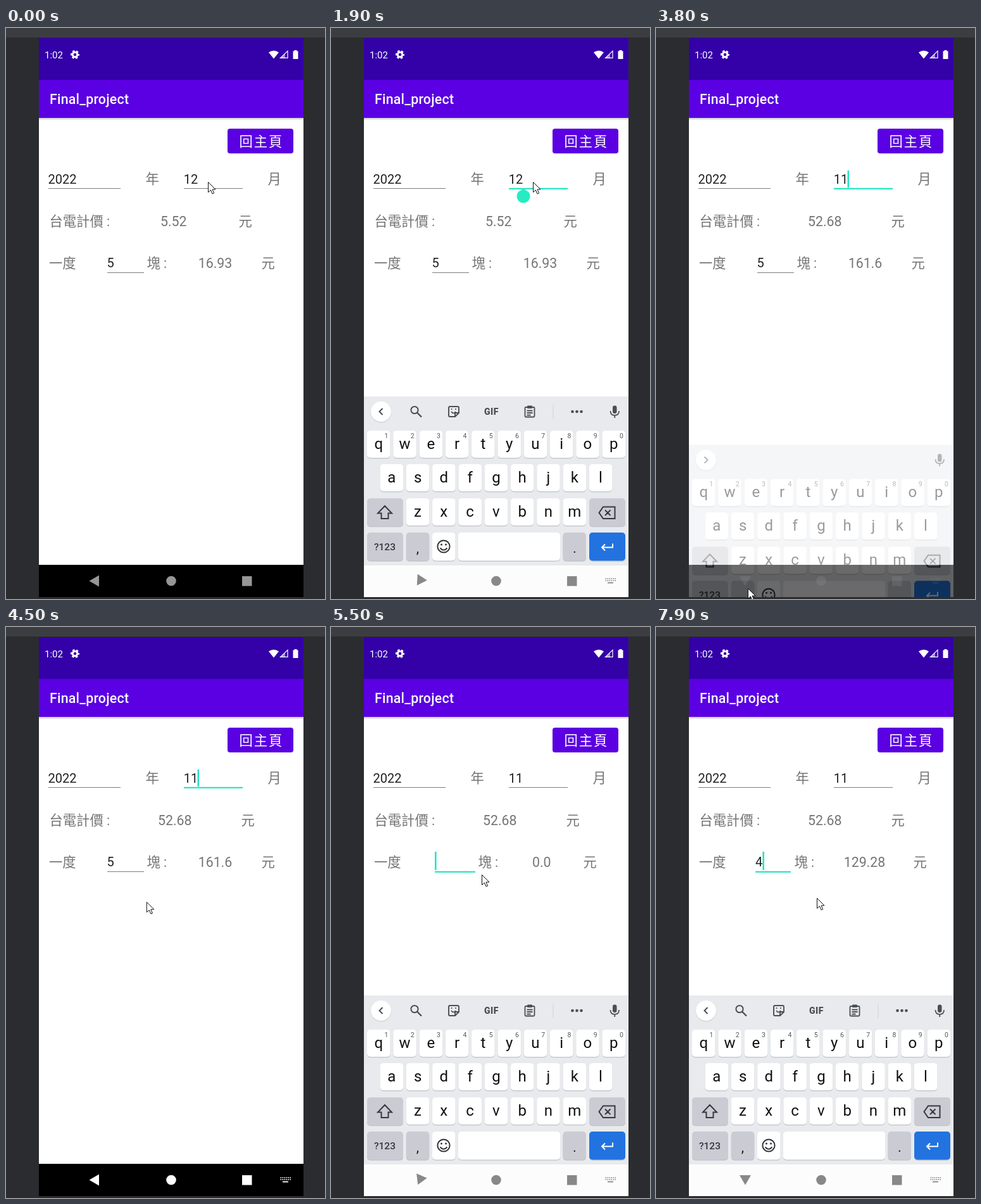
Write an HTML page that moves like this. It is 504x902 px and loops after 8 s.

```html
<!DOCTYPE html>
<html lang="zh-Hant">
<head>
<meta charset="utf-8">
<title>Final_project</title>
<style>
html, body { margin: 0; width: 100%; height: 100%; overflow: hidden; background: #2b2c2f; }
svg { display: block; width: 504px; height: 902px; }
text { font-family: Roboto, "Noto Sans CJK TC", "Noto Sans CJK JP", "Noto Sans CJK", sans-serif; white-space: pre; }
</style>
</head>
<body>
<svg id="stage" viewBox="0 0 504 902" xmlns="http://www.w3.org/2000/svg"></svg>
<script>
const LOOP = 8000;
const TEAL = '#25e3c3', GREY = '#757575', INK = '#212121', ICON = '#4b4e53';
const stage = document.getElementById('stage');

function el(parent, tag, attrs = {}, content) {
  const node = document.createElementNS('http://www.w3.org/2000/svg', tag);
  set(node, attrs);
  if (content !== undefined) node.textContent = content;
  parent.appendChild(node);
  return node;
}
function set(node, attrs) {
  for (const k in attrs) node.setAttribute(k, attrs[k]);
}
const group = (p, attrs) => el(p, 'g', attrs);
const rect = (p, x, y, width, height, fill, rx = 0) => el(p, 'rect', { x, y, width, height, fill, rx });
const circle = (p, cx, cy, r, fill) => el(p, 'circle', { cx, cy, r, fill });
const shape = (p, d, fill) => el(p, 'path', { d, fill });
const line = (p, d, stroke, width = 2) =>
  el(p, 'path', { d, fill: 'none', stroke, 'stroke-width': width });
const label = (p, x, y, str, size, fill, more) =>
  el(p, 'text', { x, y, 'font-size': size, fill, ...more }, str);
const show = (node, on) => node.setAttribute('visibility', on ? 'visible' : 'hidden');
const MID = { 'text-anchor': 'middle' };

const defs = el(stage, 'defs');
rect(el(defs, 'clipPath', { id: 'screen' }), 52, 16, 418, 883);
const fade = el(defs, 'linearGradient', { id: 'fade', x1: 0, y1: 0, x2: 0, y2: 1 });
el(fade, 'stop', { offset: 0, 'stop-color': '#000', 'stop-opacity': 0.22 });
el(fade, 'stop', { offset: 1, 'stop-color': '#000', 'stop-opacity': 0 });

// Emulator window
rect(stage, 0, 0, 504, 902, '#2b2c2f');
rect(stage, 0, 0, 504, 15, '#3c3d41');
const phone = group(stage, { 'clip-path': 'url(#screen)' });
rect(phone, 52, 16, 418, 883, '#fff');
rect(phone, 52, 142, 418, 4, 'url(#fade)');
rect(phone, 52, 15, 418, 67, '#3400a8');
rect(phone, 52, 82, 418, 60, '#5a00e2');

// Status bar
label(phone, 61, 48, '1:02', 15, '#fff');
el(phone, 'circle', { cx: 109, cy: 42, r: 3.8, fill: 'none', stroke: '#fff', 'stroke-width': 3 });
el(phone, 'circle', { cx: 109, cy: 42, r: 5.8, fill: 'none', stroke: '#fff', 'stroke-width': 2.4,
  'stroke-dasharray': '3.4 2.674', 'stroke-dashoffset': 1.7 });
shape(phone, 'M415 38.5Q423 33 431 38.5L423 48.5Z', '#fff');
line(phone, 'M433.5 47.4L445 36.4V47.4Z', '#fff', 1.2);
shape(phone, 'M433 48L441 40V48Z', '#ffffff88');
shape(phone, 'M455.5 35h4v1.5h2V49h-8V36.5h2z', '#fff');

// App page
label(phone, 69, 120, 'Final_project', 21.3, '#fff', { 'font-weight': 500, 'letter-spacing': 0.27 });
rect(phone, 350, 160, 104, 38.6, '#00000030', 4);
rect(phone, 350, 159, 104, 39, '#5a00e2', 4);
label(phone, 368.5, 187, '回主頁', 21.3, '#fff', { 'letter-spacing': 2 });

const body = (x, y, str) => label(phone, x, y, str, 21.3, GREY);
const input = (x, y, str) => label(phone, x, y, str, 20, INK);
input(66.6, 246, '2022');
rect(phone, 67, 253, 114, 1, '#7d7d7d');
body(220.5, 246, '年');
body(413.5, 246, '月');
body(68.5, 312.5, '台電計價 :');
body(68, 378.5, '一度');
const month = input(280.8, 246, '');
const bill = body(0, 312.5, '');
const billUnit = body(0, 312.5, '元');
const rate = input(0, 378, '');
const rateUnit = body(0, 378.5, '塊 :');
const cost = body(0, 378.5, '');
const costUnit = body(0, 378.5, '元');
const monthLine = rect(phone, 281, 253, 93, 1, '#7d7d7d');
const rateLine = rect(phone, 160, 386, 58, 1, '#7d7d7d');
const caret = rect(phone, 0, 0, 2.6, 28, TEAL);
const handle = shape(phone, 'M0 0L8 5.5A10.5 10.5 0 1 1 -8 5.5Z', '#24edc3');

rect(phone, 52, 848, 418, 51, '#000');

// Keyboard
const board = group(phone);
rect(board, 52, 582, 418, 330, '#e8eaed');
rect(board, 52, 849, 418, 64, '#fcfcfc');
circle(board, 79, 607, 16.5, '#d3d5d9');
circle(board, 79, 606, 16, '#fff');
const chevron = line(board, '', ICON, 2);
const tools = group(board);
el(tools, 'circle', { cx: 132, cy: 603.5, r: 5.6, fill: 'none', stroke: ICON, 'stroke-width': 2 });
line(tools, 'M136 607.5L143 614.5', ICON, 2.4);
line(tools, 'M188 598h12q2 0 2 2v8l-6 6h-8q-2 0-2-2v-12q0-2 2-2zM202 608h-6v6', ICON, 1.9);
line(tools, 'M190 606q3.5 5 7 0M190.5 601v2M197 601v2', ICON, 1.6);
label(tools, 253.5, 611, 'GIF', 14, ICON, { ...MID, 'font-weight': 900, 'letter-spacing': 0.6 });
line(tools, 'M308 599h12q1.5 0 1.5 1.5v12.5q0 1.5-1.5 1.5h-12q-1.5 0-1.5-1.5v-12.5q0-1.5 1.5-1.5zM309.5 604.5h9M309.5 608h9M309.5 611.5h6', ICON, 1.8);
rect(tools, 310, 596.5, 8, 4.5, ICON, 1);
rect(tools, 350.5, 595, 1, 23, '#cfd1d5');
for (const x of [381.5, 388.5, 395.5]) circle(tools, x, 606, 2.3, ICON);
rect(board, 445, 596.5, 6.5, 12.5, ICON, 3.2);
line(board, 'M441.5 605q0 6.8 6.75 6.8t6.75-6.8M448.25 612v4', ICON, 1.8);

function key(x, y, w, h, fill) {
  rect(board, x, y + 1.2, w, h, '#bfc1c6', 5);
  rect(board, x, y, w, h, fill, 5);
}
const PITCH = 41.28, DARK = '#cbccd3';
function keys(str, left, y, base) {
  [...str].forEach((c, i) => {
    const x = left + i * PITCH;
    key(x, y, 36.5, 43, '#fff');
    label(board, x + 18.2, base, c, 24, '#111', MID);
  });
}
keys('qwertyuiop', 57, 636, 664.5);
[...'1234567890'].forEach((c, i) => label(board, 87.5 + i * PITCH, 648, c, 10.5, '#55585d', MID));
keys('asdfghjkl', 77.6, 689, 718);
keys('zxcvbnm', 118.8, 743, 772);
key(57, 743, 57, 44, DARK);
key(408, 743, 57, 44, DARK);
line(board, 'M85 755l-11 11.5h5.5v8.5h11v-8.5h5.5z', '#36383c');
line(board, 'M430 756.5h18.5v18.5h-18.5l-6.5-9.25zM433 761.5l8.5 8.5M441.5 761.5l-8.5 8.5', '#36383c');
key(57, 797, 57, 44.5, DARK);
key(118.8, 797, 36.5, 44.5, DARK);
key(160, 797, 36.5, 44.5, '#fff');
key(201, 797, 161, 44.5, '#fff');
key(366.5, 797, 36.5, 44.5, DARK);
key(408, 797, 57, 44.5, '#2273df');
label(board, 85, 825, '?123', 15.5, '#36383c', { ...MID, 'font-weight': 500 });
label(board, 137, 829, ',', 22, '#222', MID);
label(board, 385, 829, '.', 22, '#222', MID);
el(board, 'circle', { cx: 178, cy: 819, r: 9.6, fill: 'none', stroke: '#36383c', 'stroke-width': 2 });
circle(board, 174.5, 816, 1.5, '#36383c');
circle(board, 181.5, 816, 1.5, '#36383c');
line(board, 'M172.5 821.5q5.5 6.5 11 0', '#36383c');
line(board, 'M445 814.5v6h-17M433 815.5l-5 5 5 5', '#fff');

// Navigation icons, coloured through their group
const nav = group(phone);
const back = el(nav, 'path', { d: 'M-9.5 0L6 -9V9Z' });
el(nav, 'circle', { cx: 261, cy: 873.5, r: 7.8 });
const block = (p, x, y, width, height) => el(p, 'rect', { x, y, width, height });
block(nav, 373, 866, 15.5, 15.5);
const dots = group(nav);
for (let row = 0; row < 2; row++)
  for (let col = 0; col < 6; col++) block(dots, 433.5 + col * 3, 869 + row * 3, 1.6, 1.6);
block(dots, 437, 875.5, 9, 1.8);

const mouse = el(stage, 'path', { d: 'M0 0V16L3.9 12.5 6.6 18.5 9.1 17.4 6.5 11.5H11.5Z',
  fill: '#fff', stroke: '#111', 'stroke-width': 1, 'stroke-linejoin': 'round' });

// Timing
const clamp = v => Math.min(1, Math.max(0, v));
const ramp = (t, from, to) => clamp((t - from) / (to - from));
function bezier(x1, y1, x2, y2) {
  const at = (a, b, s) => 3 * a * s * (1 - s) ** 2 + 3 * b * s * s * (1 - s) + s ** 3;
  return x => {
    let lo = 0, hi = 1;
    for (let i = 0; i < 24; i++) {
      const m = (lo + hi) / 2;
      if (at(x1, x2, m) < x) lo = m; else hi = m;
    }
    return at(y1, y2, lo);
  };
}
const easeShow = bezier(0.4, 0, 0.2, 1);
const easeHide = bezier(0.4, 0, 1, 1);
const easeMove = bezier(0.4, 0, 0.5, 1);

const T = { tap: 1300, show: 1609, erase: 2200, type: 2500, hide: 3659,
  tap2: 4900, show2: 5191, erase2: 5300, type2: 6800 };
const moves = [
  [0, 319, 243], [2050, 319, 243], [2750, 223, 745], [3000, 223, 745], [3550, 145, 885],
  [3900, 145, 885], [4700, 230, 386], [5300, 230, 386], [5500, 238, 391], [5900, 247, 404],
  [6300, 247, 404], [6900, 254, 428], [LOOP, 254, 428]
];
// rate text, text x, line x, line width, unit x, cost, cost x, cost unit x
const rows = [
  [0, '5', 159.6, 160, 58, 222.5, '16.93', 303.7, 403.5],
  [T.type, '5', 159.6, 160, 58, 222.5, '161.6', 303.7, 403.5],
  [T.erase2, '', 164, 164, 64, 232.5, '0.0', 318, 398.5],
  [T.type2, '4', 157, 157, 56, 218.5, '129.28', 296.7, 406.5]
];

function drawForm(t) {
  month.textContent = t < T.erase ? '12' : t < T.type ? '1' : '11';
  const high = t >= T.type;
  bill.textContent = high ? '52.68' : '5.52';
  bill.setAttribute('x', high ? 240 : 244);
  billUnit.setAttribute('x', high ? 371.5 : 367.5);

  const [, str, tx, lx, lw, ux, sum, sx, cx] = rows.filter(r => r[0] <= t).pop();
  rate.textContent = str;
  cost.textContent = sum;
  rate.setAttribute('x', tx);
  rateUnit.setAttribute('x', ux);
  cost.setAttribute('x', sx);
  costUnit.setAttribute('x', cx);

  const inMonth = t >= T.tap && t < T.tap2, inRate = t >= T.tap2;
  const style = (on, y) => on ? { y: y - 0.3, height: 2.2, fill: TEAL } : { y, height: 1, fill: '#7d7d7d' };
  set(monthLine, style(inMonth, 253));
  set(rateLine, { x: lx, width: lw, ...style(inRate, 386) });

  const since = [T.tap, T.erase, T.type, T.tap2, T.erase2, T.type2].filter(v => v <= t).pop();
  show(caret, since !== undefined && (t - since) % 1000 < 500);
  set(caret, inRate
    ? { x: str ? tx + 11.4 : 164, y: 355, height: 29 }
    : { x: since === T.erase ? 291.3 : 302.5, y: 225, height: 27 });
  show(handle, (inMonth && t < T.erase) || (inRate && t < T.erase2 + 80));
  handle.setAttribute('transform', inRate ? 'translate(171 386)' : 'translate(304 253.5)');
}

function drawBoard(t) {
  let p, alpha;
  const hiding = t >= T.hide && t < T.show2;
  if (hiding) {
    p = 1 - easeHide(ramp(t, T.hide, T.hide + 340));
    alpha = p ** 3.2;
  } else {
    const start = t < T.hide ? T.show : T.show2;
    p = easeShow(ramp(t, start, start + 285));
    alpha = p ** 1.45;
  }
  set(board, { transform: `translate(0 ${318 * (1 - p)})`, opacity: alpha });
  show(board, p > 0);
  show(tools, !hiding);
  chevron.setAttribute('d', hiding ? 'M76.5 601l5 5-5 5' : 'M81.5 601l-5 5 5 5');

  const turn = ramp(t, 1800, 1960) - ramp(t, 3850, 4000) + ramp(t, 5380, 5543);
  back.setAttribute('transform', `translate(141 ${873.5 - 1.5 * turn}) rotate(${-90 * turn})`);
  const white = ramp(t, 3700, 4000) - ramp(t, 5320, 5460);
  const tone = Math.round((t < 1750 ? 150 : 136) * (1 - white) + 255 * white);
  set(nav, { fill: `rgb(${tone},${tone},${tone})`, opacity: hiding ? 0.15 + 0.85 * ramp(t, 3800, 4000) : 1 });
  show(dots, p > 0 || (t > T.hide && t < T.show2));
}

function drawMouse(t) {
  const i = moves.findIndex(m => m[0] > t);
  const [t0, x0, y0] = moves[i - 1], [t1, x1, y1] = moves[i];
  const k = easeMove(ramp(t, t0, t1));
  mouse.setAttribute('transform', `translate(${x0 + (x1 - x0) * k + 0.5} ${y0 + (y1 - y0) * k + 0.5})`);
}

const begin = performance.now();
function frame(now) {
  const t = Math.max(0, now - begin) % LOOP;
  drawForm(t);
  drawBoard(t);
  drawMouse(t);
  requestAnimationFrame(frame);
}
frame(begin);
</script>
</body>
</html>
```
